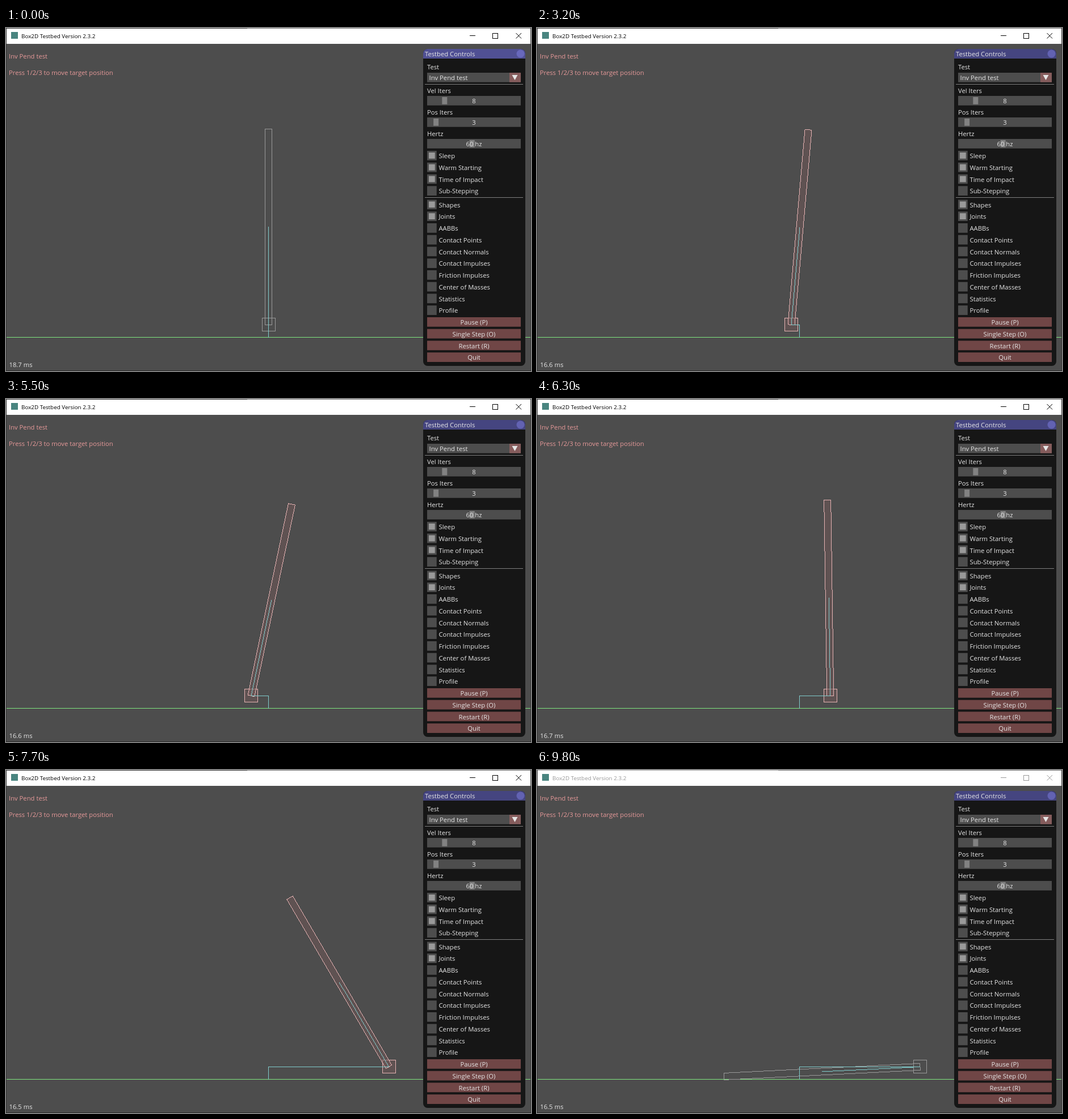
An HTML page with a canvas that plays this animation: 925x606 px, repeating every 9.9 s.

```html
<!DOCTYPE html>
<html lang="en">
<head>
<meta charset="utf-8">
<title>Inverted pendulum</title>
<style>
  html, body { margin: 0; width: 100%; height: 100%; overflow: hidden; background: #4d4d4d; }
  canvas { display: block; }
</style>
</head>
<body>
<canvas id="stage" width="925" height="606"></canvas>
<script>
const g = document.getElementById('stage').getContext('2d');
const LOOP = 9.9, STEPS_PER_SECOND = 10;
const GRAB = 1.2, TOPPLE = 6.8, LAND = 8.9, SLEEP = 9.5;
const HOME = 462.5, PIVOT_Y = 524.4, GROUND_Y = 546, ROD = 346, CART = 11.5;
const INK = '#e6e6e6', FIELD = '#4d4d4d', BUTTON = '#704646', JOINT = '#80cccc';

// Turning points while balancing: seconds, cart x, rod angle from upright
const TURNS = [
  [GRAB, HOME, 0], [1.4, 465.5, -.0116], [3.2, 448, .0868], [4, 450, .2],
  [4.6, 485, .1], [5.5, 432, .208], [TOPPLE, 607.5, -.253]
];

function balance(t) {
  const i = Math.max(1, TURNS.findIndex(turn => turn[0] > t));
  const [t0, x0, a0] = TURNS[i - 1], [t1, x1, a1] = TURNS[i];
  const u = Math.max(0, (t - t0) / (t1 - t0));
  const ease = t1 === TOPPLE ? u ** 1.5 : u * u * (3 - 2 * u);
  return { x: x0 + (x1 - x0) * ease, angle: a0 + (a1 - a0) * ease };
}

// The cart brakes exponentially while the rod falls faster and faster
function topple(t) {
  const s = t - TOPPLE, u = Math.min(1, s / (LAND - TOPPLE));
  return {
    x: 675 - 67.5 * Math.exp(-s / .18),
    angle: -.38 - 1.24 * u ** 2.5 + .127 * Math.exp(-s / .09)
  };
}

function rect(x, y, w, h, color, radius = 0) {
  g.fillStyle = color;
  g.beginPath();
  g.roundRect(x, y, w, h, radius);
  g.fill();
}

function text(str, x, y, color = INK, align = 'left', size = 11.25) {
  g.font = `${size}px "Open Sans", "Noto Sans", sans-serif`;
  g.textAlign = align;
  g.fillStyle = color;
  g.fillText(str, x, y);
}

function trace(points) {
  g.beginPath();
  points.forEach(p => g.lineTo(...p));
}

// One-pixel line without smoothing
function line([x0, y0], [x1, y1], color) {
  const n = Math.ceil(Math.max(Math.abs(x1 - x0), Math.abs(y1 - y0))) || 1;
  g.fillStyle = color;
  for (let i = 0; i <= n; i++) {
    g.fillRect(Math.floor(x0 + (x1 - x0) * i / n), Math.floor(y0 + (y1 - y0) * i / n), 1, 1);
  }
}

function body(points, awake) {
  if (awake) {
    trace(points);
    g.fillStyle = 'rgba(115,89,89,.5)';
    g.fill();
  }
  points.forEach((p, i) => line(p, points[(i + 1) % 4], awake ? '#e6b3b3' : '#999'));
}

const box = (left, top, right, bottom, place) =>
  [place(left, top), place(right, top), place(right, bottom), place(left, bottom)];

function drawWorld(t) {
  const { x, angle } = t < TOPPLE ? balance(t) : topple(t);
  const awake = t >= GRAB && t < SLEEP;
  const sin = Math.sin(angle), cos = Math.cos(angle);
  const onCart = (dx, dy) => [x + dx, PIVOT_Y + dy];
  const onRod = (dx, dy) => [x + dx * cos - dy * sin, PIVOT_Y + dx * sin + dy * cos];

  line([0, GROUND_Y], [925, GROUND_Y], '#80e680');
  body(box(-CART, -CART, CART, CART, onCart), awake);
  body(box(-6, -ROD, 6, 0, onRod), awake);
  line([HOME, GROUND_Y], [HOME, PIVOT_Y], JOINT);
  line([HOME, PIVOT_Y], onCart(0, 0), JOINT);
  line(onCart(0, 0), onRod(0, -ROD / 2), JOINT);
  if (awake && t < 1.7) rect(x - 2.5, 517, 6, 4, '#00f000');

  text('Inv Pend test', 5, 54, '#e69999');
  text('Press 1/2/3 to move target position', 5, 83, '#e69999');
  const flicker = Math.round(Math.sin(t * 10.575 * Math.PI)) / 10;
  text((16.6 + 2.1 * Math.exp(-t / .6) + flicker).toFixed(1) + ' ms', 5.5, 599);
}

function drawWindow(active) {
  const ink = active ? '#000' : '#999';
  rect(0, 0, 925, 28, '#fff');
  rect(9, 7, 12, 12, '#4a8580');
  text('Box2D Testbed Version 2.3.2', 27, 18, ink, 'left', 9.85);
  g.strokeStyle = ink;
  g.strokeRect(857.5, 9.5, 9, 9);
  trace([[817, 13.5], [827, 13.5]]);
  g.moveTo(898.5, 9);
  g.lineTo(908, 18.5);
  g.moveTo(908, 9);
  g.lineTo(898.5, 18.5);
  g.stroke();

  rect(0, 0, 425, 1, active ? '#333' : '#aaa');
  rect(425, 0, 500, 1, '#777');
  rect(0, 0, 1, 606, '#333');
  rect(924, 0, 1, 606, '#3a3a3a');
  rect(0, 605, 925, 1, '#282828');
}

function drawPanel(t) {
  const focused = t < GRAB, hovering = t >= 8.3 && t < 9.3;
  const height = 16.75, pitch = height + 4;
  const field = (y, width = 165, color = FIELD) => rect(742, y, width, height, color);
  const separator = y => rect(738, y, 173, 1, '#808080');

  rect(735, 37, 180, 560, '#161616', 8);
  rect(735, 37, 180, 17, focused ? '#505094' : '#454580', [8, 8, 0, 0]);
  text('Testbed Controls', 738, 50);
  rect(899.5, 38.5, 14, 14, focused ? '#6868bc' : '#6262b2', 7);

  text('Test', 742, 73);
  field(79);
  rect(887, 79, 20, height, '#855c5c');
  text('Inv Pend test', 745.5, 92);
  trace([[891.5, 83], [901.5, 83], [896.5, 92]]);
  g.fillStyle = INK;
  g.fill();
  separator(99);

  const slider = (label, value, fraction, row) => {
    const y = 120 + row * 38;
    text(label, 742, y - 5);
    field(y);
    rect(744 + fraction * 152, y + 2, 9, height - 4, '#828282');
    text(value, 824.5, y + 13, INK, 'center');
  };
  slider('Vel Iters', '8', 8 / 50, 0);
  slider('Pos Iters', '3', 3 / 50, 1);
  slider('Hertz', '60 hz', 55 / 115, 2);

  let y = 217;
  const checkboxes = (labels, checked) => labels.forEach((label, i) => {
    field(y, height);
    if (i < checked) rect(745, y + 3, height - 6, height - 6, '#999');
    text(label, 762.5, Math.round(y + 13));
    y += pitch;
  });
  checkboxes(['Sleep', 'Warm Starting', 'Time of Impact', 'Sub-Stepping'], 3);
  separator(299);
  y += 3.5;
  checkboxes(['Shapes', 'Joints', 'AABBs', 'Contact Points', 'Contact Normals',
    'Contact Impulses', 'Friction Impulses', 'Center of Masses', 'Statistics', 'Profile'], 2);

  for (const label of ['Pause (P)', 'Single Step (O)', 'Restart (R)', 'Quit']) {
    field(y, 165, hovering && label === 'Restart (R)' ? '#ab6666' : BUTTON);
    text(label, 824.5, Math.round(y + 13), INK, 'center');
    y += pitch;
  }
}

function draw(seconds) {
  const t = Math.floor(seconds % LOOP * STEPS_PER_SECOND) / STEPS_PER_SECOND;
  rect(0, 0, 925, 606, FIELD);
  drawWorld(t);
  drawWindow(t < SLEEP);
  drawPanel(t);
}

let start;
function tick(now) {
  start ??= now;
  draw((now - start) / 1000);
  requestAnimationFrame(tick);
}
requestAnimationFrame(tick);
</script>
</body>
</html>
```
